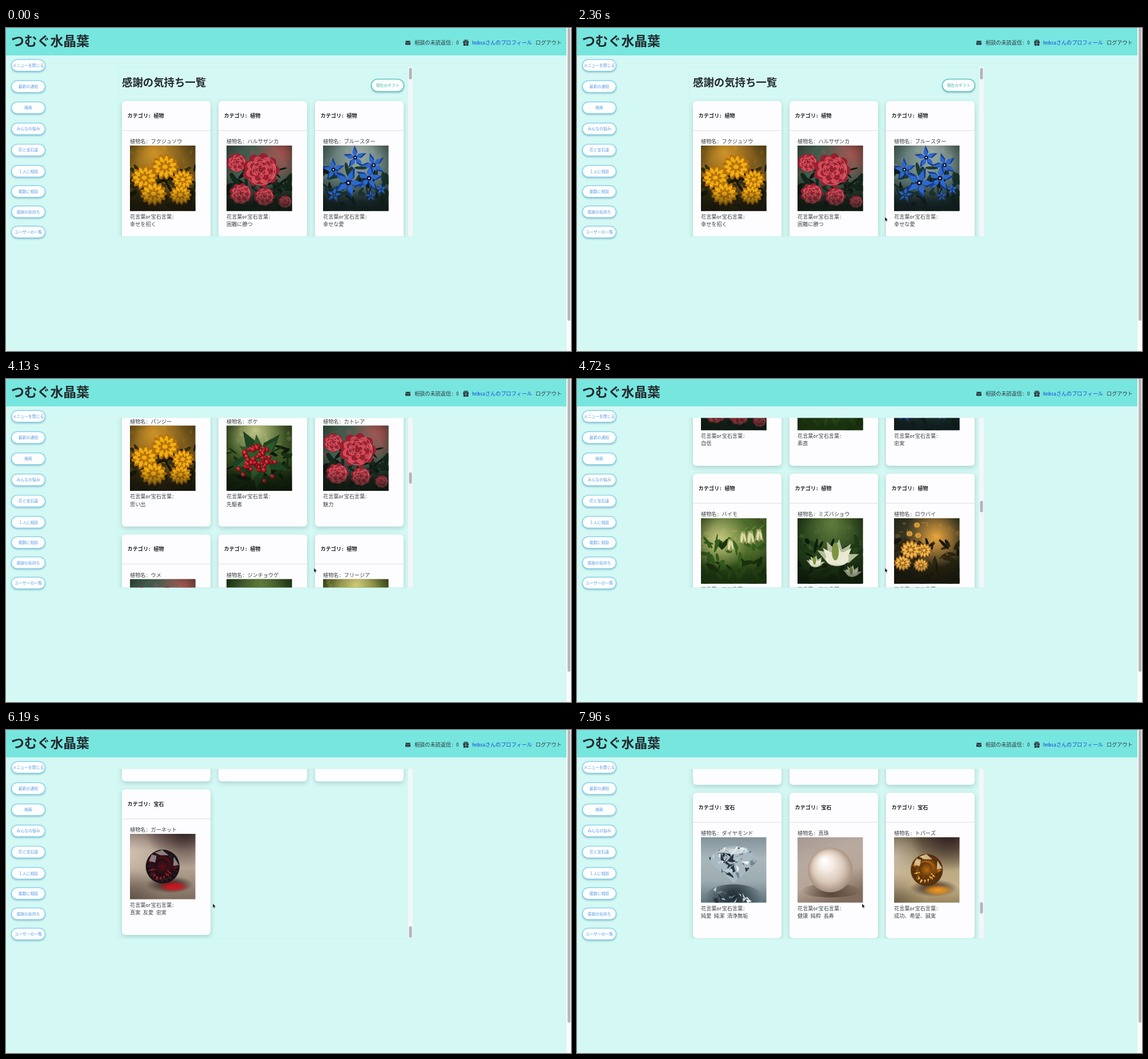
Recreate the animation shown at these times as an HTML page with a canvas. Size 989 by 566 pixels, loop 8000 ms.

```html
<!DOCTYPE html>
<html lang="ja">
<head>
<meta charset="utf-8">
<title>感謝の気持ち一覧</title>
<style>
html, body { margin: 0; width: 100%; height: 100%; overflow: hidden; background: #d4f8f4; }
canvas { display: block; }
</style>
</head>
<body>
<canvas id="stage" width="989" height="566"></canvas>
<script>
const ctx = document.getElementById('stage').getContext('2d');
const LOOP = 8000, STEP = 294.8, TAU = Math.PI * 2;
const FONT = '"Noto Sans Mono CJK JP", "Noto Sans CJK JP", "Noto Sans CJK", sans-serif';
const MAX_SCROLL = 3521, ROW = 269, PHOTO = 114.5;

// Key poses: [step, value...]
const scrollKeys = [[9, 0], [10, 60], [11, 234], [16, 1845], [20, MAX_SCROLL], [25, MAX_SCROLL], [26, 3290], [27, 2977]];
const cursorKeys = [[4, 690, 543], [5, 639, 487], [7, 539, 331], [20, 539, 331], [21, 362, 304],
  [22, 285, 250], [23, 400, 285], [24, 500, 306], [25, 499, 304]];

const rows = [
  'フクジュソウ:幸せを招く:gold|ハルサザンカ:困難に勝つ:rose|ブルースター:幸せな愛:star',
  'ラッパスイセン:尊敬:daffodil|マンリョウ:寿ぎ:berry|ナワシロイチゴ:恩恵:straw',
  'スノードロップ:希望:bell|スイートピー:門出:rose|アネモネ:期待:star',
  'ヒヤシンス:遊び心:star|クロッカス:青春:cup|シクラメン:内気:rose',
  'パンジー:思い出:gold|ボケ:先駆者:berry|カトレア:魅力:rose',
  'ウメ:高潔:rose|ジンチョウゲ:栄光:cup|フリージア:純潔:daffodil',
  'プリムラ:自信:rose|ネコヤナギ:素直:bell|スミレ:忠実:star',
  'バイモ:威厳:bell|ミズバショウ:美しい思い出:cup|ロウバイ:慈愛:amber',
  'ツバキ:誇り:rose|サンシュユ:持続:amber|モクレン:崇高:cup',
  'タンポポ:誠実:gold|アヤメ:吉報:star|スズラン:再来:bell',
  'エメラルド:幸運:emerald|ルビー:情熱:garnet|サファイア:誠実:sapphire',
  'ダイヤモンド:純愛 純潔 清浄無垢:diamond|真珠:健康 純粋 長寿:pearl|トパーズ:成功、希望、誠実:topaz',
  'アメジスト:心の平和:amethyst|オパール:希望:pearl|ターコイズ:成功:sapphire',
  'ガーネット:真実 友愛 忠実:garnet'
].map(r => r.split('|').map(s => s.split(':')));

const menu = ['メニューを閉じる', '最新の通知', '検索', 'みんなの悩み', '花と宝石達', '１人に相談', '複数に相談', '感謝の気持ち', 'ユーザーの一覧'];

function random(seed) {
  return () => {
    seed = (seed * 16807) % 2147483647;
    return seed / 2147483647;
  };
}

function sample(keys, k) {
  if (k <= keys[0][0]) return keys[0].slice(1);
  for (let i = 1; i < keys.length; i++) {
    const a = keys[i - 1], b = keys[i];
    if (k <= b[0]) {
      const u = (k - a[0]) / (b[0] - a[0]);
      return a.slice(1).map((v, j) => v + (b[j + 1] - v) * u);
    }
  }
  return keys[keys.length - 1].slice(1);
}

// Shape helpers
function rect(x, y, w, h, c) { ctx.fillStyle = c; ctx.fillRect(x, y, w, h); }

function round(x, y, w, h, r, c) {
  ctx.beginPath();
  ctx.roundRect(x, y, w, h, r);
  ctx.fillStyle = c;
  ctx.fill();
}

function oval(x, y, rx, ry, c, turn = 0) {
  ctx.beginPath();
  ctx.ellipse(x, y, rx, ry, turn, 0, TAU);
  ctx.fillStyle = c;
  ctx.fill();
}

function poly(points, c) {
  ctx.beginPath();
  points.forEach(p => ctx.lineTo(p[0], p[1]));
  ctx.closePath();
  ctx.fillStyle = c;
  ctx.fill();
}

function line(x1, y1, x2, y2, w, c) {
  ctx.beginPath();
  ctx.moveTo(x1, y1);
  ctx.lineTo(x2, y2);
  ctx.lineWidth = w;
  ctx.strokeStyle = c;
  ctx.stroke();
}

function text(s, x, y, size, c, weight = 400, align = 'left') {
  ctx.font = `${weight} ${size}px ${FONT}`;
  ctx.textAlign = align;
  ctx.fillStyle = c;
  ctx.fillText(s, x, y + size * 0.37);
}

function shadow(c, blur, dy) {
  ctx.shadowColor = c;
  ctx.shadowBlur = blur;
  ctx.shadowOffsetY = dy;
}
const noShadow = () => shadow('transparent', 0, 0);

function stops(g, colors) {
  colors.forEach((c, i) => g.addColorStop(i / (colors.length - 1), c));
  return g;
}
const blend = (x0, y0, x1, y1, ...colors) => stops(ctx.createLinearGradient(x0, y0, x1, y1), colors);
const halo = (x, y, r, ...colors) => stops(ctx.createRadialGradient(x, y, 0, x, y, r), colors);
const wash = c => rect(0, 0, 115, 115, c);
const light = (x, y, r, c, alpha = 'ff') => wash(halo(x, y, r, c + alpha, c + '00'));

// Flowers
function petals(x, y, n, r, w, c, phase = 0) {
  for (let i = 0; i < n; i++) {
    const a = phase + i / n * TAU;
    oval(x + Math.cos(a) * r * 0.58, y + Math.sin(a) * r * 0.5, r * 0.44, r * w, c, a);
  }
}

function spikes(x, y, n, r, c, from, to) {
  for (let i = 0; i < n; i++) {
    const a = from + (to - from) * i / n;
    const at = (d, s) => [x + Math.cos(a + d) * r * s, y + Math.sin(a + d) * r * s];
    poly([[x, y], at(-0.42, 0.5), at(0, 1), at(0.42, 0.5)], c);
  }
}

const blooms = {
  daisy(x, y, r, a, b) {
    oval(x, y + r * 0.3, r * 0.8, r * 0.6, '#00000055');
    petals(x, y, 13, r, 0.19, b);
    petals(x, y, 11, r * 0.85, 0.17, a, 0.3);
    petals(x, y, 8, r * 0.5, 0.2, b, 0.1);
    oval(x, y, r * 0.2, r * 0.16, a);
  },
  rose(x, y, r, a, b) {
    for (let i = 0; i < 5; i++) petals(x, y, 9 - i, r * (1 - i * 0.18), 0.32, i % 2 ? a : b, i * 0.5);
    for (let i = 0; i < 5; i++) {
      ctx.beginPath();
      ctx.arc(x, y, r * (0.16 + i * 0.16), i * 1.3, i * 1.3 + 3.6);
      ctx.lineWidth = 0.9;
      ctx.strokeStyle = i % 2 ? b : '#e88a8a';
      ctx.stroke();
    }
  },
  star(x, y, r, a, b) {
    spikes(x, y, 5, r, b, r, r + TAU);
    spikes(x, y, 5, r * 0.85, a, r - 0.1, r - 0.1 + TAU);
    oval(x, y, r * 0.16, r * 0.16, '#0b1238');
    oval(x, y, r * 0.06, r * 0.06, '#dfe8ff');
  },
  berry(x, y, r, a, b) {
    oval(x, y, r, r, b);
    oval(x - r * 0.15, y - r * 0.15, r * 0.75, r * 0.75, a);
    oval(x - r * 0.3, y - r * 0.4, r * 0.2, r * 0.2, '#f0948c');
  },
  straw(x, y, r, a, b) {
    line(x, y - r, x + 3, y - r * 2.4, 0.9, '#6f8c2c');
    oval(x, y, r * 0.85, r, b);
    oval(x - 1, y - 1, r * 0.65, r * 0.75, a);
    spikes(x, y - r * 0.8, 5, r * 0.7, '#6d8c2d', -0.4, 4);
  },
  bell(x, y, r, a, b) {
    line(x, y - r, x + r * 0.8, y - r * 1.7, 1.2, '#6f9a3a');
    poly([[x - r * 0.35, y - r], [x + r * 0.35, y - r], [x + r * 0.75, y + r], [x + r * 0.35, y + r * 0.7],
      [x, y + r], [x - r * 0.35, y + r * 0.7], [x - r * 0.75, y + r]], b);
    oval(x - r * 0.15, y, r * 0.22, r * 0.8, a, 0.12);
    oval(x + r * 0.3, y, r * 0.15, r * 0.7, a, -0.2);
  },
  cup(x, y, r, a, b) {
    spikes(x, y + r * 0.6, 5, r * 1.3, b, -2.6, 0.2);
    spikes(x, y + r * 0.7, 3, r * 1.2, a, -2.3, -0.1);
    oval(x, y + r * 0.4, r * 0.65, r * 0.42, a);
    oval(x - r * 0.1, y, r * 0.2, r * 0.5, '#7d9440');
  }
};

const scenes = {
  gold: { sky: '#8a6420', ground: '#1b170c', glow: ['#e3a12b', 40, 12], leaf: '#38330f', kind: 'daisy', tint: ['#eeb014', '#b87008'],
    at: [[61, 37, 24], [92, 59, 19], [25, 56, 23], [88, 86, 19], [41, 84, 23]] },
  rose: { sky: '#4a6455', ground: '#101a14', glow: ['#c9605f', 100, 10], leaf: '#162c20', kind: 'rose', tint: ['#d34c58', '#972031'],
    at: [[18, 30, 18], [102, 98, 12], [60, 43, 32], [66, 89, 18], [25, 84, 20]] },
  star: { sky: '#6a8684', ground: '#101d20', glow: ['#a9bab4', 65, 10], leaf: '#1d3a34', kind: 'star', tint: ['#2b69cf', '#173a90'],
    at: [[56, 21, 21], [88, 34, 22], [18, 42, 21], [80, 57, 25], [44, 65, 29], [19, 86, 15], [83, 88, 11], [101, 76, 11]] },
  daffodil: { sky: '#68762a', ground: '#18290c', glow: ['#e6dc83', 58, 10], leaf: '#2b4714', kind: 'daisy', tint: ['#f0bd2b', '#c98711'],
    stems: true, at: [[15, 38, 10], [32, 34, 9], [52, 27, 9], [70, 31, 10], [89, 39, 12], [24, 55, 8], [43, 48, 11], [67, 49, 11], [84, 57, 9], [99, 55, 8]] },
  berry: { sky: '#47612a', ground: '#0e190b', glow: ['#d5da94', 50, 8], leaf: '#1c3717', kind: 'berry', tint: ['#c31f2b', '#690a15'],
    cluster: [57, 57, 27], at: [[21, 76, 4], [29, 86, 4], [80, 89, 4], [66, 97, 4]] },
  straw: { sky: '#66792f', ground: '#152610', glow: ['#dcda92', 56, 14], leaf: '#2f4e19', kind: 'straw', tint: ['#cf292f', '#8d1219'],
    white: true, at: [[41, 36, 8], [70, 39, 8], [29, 65, 7], [93, 68, 7], [76, 88, 8], [25, 84, 6], [73, 54, 6], [106, 60, 5]] },
  bell: { sky: '#55762f', ground: '#1b360f', glow: ['#d8d889', 30, 36], leaf: '#3a651e', kind: 'bell', tint: ['#dddca6', '#929d58'],
    at: [[51, 47, 11], [73, 34, 11], [86, 34, 12], [101, 30, 11]] },
  cup: { sky: '#2f4d21', ground: '#0f1d0b', glow: ['#6b8742', 60, 8], leaf: '#214118', kind: 'cup', tint: ['#eae9d4', '#b5bd9a'],
    at: [[31, 74, 14], [95, 91, 14], [69, 58, 31]] },
  amber: { sky: '#3d3a28', ground: '#1a170f', glow: ['#f5ad42', 75, 32], leaf: '#33290f', kind: 'daisy', tint: ['#eeb850', '#a76c1d'],
    at: [[15, 78, 15], [52, 56, 14], [29, 55, 18], [47, 82, 13], [27, 27, 6], [40, 12, 6], [42, 30, 6]] }
};

function drawScene(s) {
  const rnd = random(s.at.length * 977 + s.at[0][0]);
  wash(blend(0, 0, 0, 114, s.sky, s.sky, s.ground));
  const [glow, gx, gy] = s.glow;
  light(gx, gy, 55, glow);
  for (let i = 0; i < 18; i++) oval(rnd() * 114, rnd() * 55, 1 + rnd() * 4, 1 + rnd() * 4, glow + '44');
  for (let i = 0; i < 60; i++) {
    oval(rnd() * 114, 38 + rnd() * 76, 5 + rnd() * 9, 1.5 + rnd() * 3, i % 3 ? s.leaf : s.ground, rnd() * 3);
  }
  wash(halo(57, 42, 88, '#08100600', '#08100622', '#081006bb'));
  if (s.stems) {
    for (let i = 0; i < 16; i++) line(51 + i * 3, 50 + i % 3 * 4, 55 + i * 2.6, 105, 2.6, i % 2 ? '#3b6618' : '#1c380c');
  }
  const draw = (x, y, r) => blooms[s.kind](x, y, r, ...s.tint);
  if (s.cluster) {
    const [cx, cy, cr] = s.cluster;
    spikes(cx, cy, 5, 55, '#1f4320', 0.4, 0.4 + TAU);
    spikes(cx, cy, 7, 42, '#30582a', 0.1, 0.1 + TAU);
    for (let i = 0; i < 50; i++) {
      const a = rnd() * TAU, d = cr * Math.sqrt(1 - i / 50);
      draw(cx + Math.cos(a) * d * 1.1, cy + Math.sin(a) * d * 0.85, 3 + rnd() * 1.6);
    }
  }
  if (s.white) for (const [x, y] of [[53, 58], [60, 72], [17, 53], [94, 35], [35, 92]]) {
    petals(x, y, 5, 8, 0.32, '#e6e4d4');
    oval(x, y, 2, 2, '#c9a932');
  }
  s.at.forEach(b => draw(...b));
  wash(blend(0, 78, 0, 114, s.ground + '00', s.ground + 'cc'));
}

// Gems
function roundGem(cx, cy, r, [dark, mid, bright, shine]) {
  const rnd = random(41);
  const at = (a, s) => [cx + Math.cos(a) * r * s, cy + Math.sin(a) * r * s];
  oval(cx, cy, r, r, dark);
  for (let i = 0; i < 20; i++) {
    const a = i / 20 * TAU;
    poly([at(a, 0.97), at(a + 0.25, 0.7), at(a - 0.1, 0.66)], rnd() < 0.3 ? mid : '#4b414455');
  }
  oval(cx, cy, r * 0.7, r * 0.7, blend(0, cy - r * 0.7, 0, cy + r * 0.7, mid, dark));
  for (let i = 0; i < 26; i++) {
    const a = 0.1 + rnd() * 2.9, s = 0.35 + rnd() * 0.4;
    poly([at(a, s), at(a + 0.12, s + 0.2), at(a + 0.2, s - 0.05)], i % 2 ? bright : dark);
  }
  for (let i = 0; i < 16; i++) {
    const a = Math.PI + i / 16 * Math.PI;
    poly([at(a, 0.7), at(a + 0.1, 0.52), at(a + 0.2, 0.7)], dark);
  }
  oval(cx - r * 0.08, cy - r * 0.08, r * 0.42, r * 0.4, halo(cx, cy, r * 0.5, mid, dark));
  poly([at(-2.75, 0.88), at(-2.3, 0.96), at(-2.1, 0.72), at(-2.65, 0.5)], shine);
  poly([at(-2.1, 0.95), at(-1.6, 0.99), at(-1.1, 0.75), at(-1.75, 0.68)], shine);
  poly([at(-0.72, 0.88), at(-0.1, 0.97), at(-0.05, 0.62)], shine);
}

function stone(back, glow, colors, r = 29.5) {
  return () => {
    wash(blend(0, 0, 0, 114, ...back));
    light(0, 34, 55, '#dccdbd', 'aa');
    light(95, -8, 68, '#2a191c', 'f0');
    light(0, 118, 55, '#4a3d34', '99');
    ctx.save();
    ctx.translate(77, 92);
    ctx.scale(1, 0.36);
    oval(-8, -10, 42, 42, halo(-8, -10, 42, '#1a0e0eee', '#1a0e0e88', '#1a0e0e00'));
    oval(-1, 0, 27, 27, halo(-1, 0, 27, glow, glow + 'bb', glow + '00'));
    ctx.restore();
    roundGem(57, 57, r, colors);
  };
}

const beige = ['#7a6860', '#b7a595', '#b5a493', '#9c8b7b', '#7c6c5f'];
const gems = {
  garnet: stone(beige, '#d3161f', ['#180f14', '#5a0f18', '#ad1b26', '#aaa3a2c0']),
  emerald: stone(beige, '#1fae68', ['#0b2418', '#126640', '#38bd79', '#cfe0d6c0']),
  sapphire: stone(beige, '#2b5fd8', ['#0c1534', '#193d94', '#4a82e2', '#cdd6e6c0']),
  amethyst: stone(beige, '#9148cc', ['#22102f', '#5d2c88', '#a868db', '#dbcfe2c0']),
  topaz: stone(['#62563f', '#8d7d5e', '#bba981', '#c4b088', '#9a865f'], '#f59a1c', ['#5a300a', '#b76b10', '#f4b63c', '#f3dfb4c0'], 28),
  pearl() {
    wash(blend(15, 0, 60, 114, '#a79b93', '#b9aaa0', '#b7a598', '#806c5d'));
    oval(58, 93, 52, 12, halo(58, 93, 52, '#4b382cdd', '#4b382c00'));
    const g = ctx.createRadialGradient(46, 40, 2, 57, 57, 40);
    oval(57, 57, 39, 39, stops(g, ['#ffffff', '#f2e8df', '#dac8b9', '#a28b7b']));
  },
  diamond() {
    const rnd = random(73), shades = ['#26343e', '#eef5f8', '#71858f', '#bccdd5', '#17222a'];
    const shards = (n, x, y, w, h, size) => {
      for (let i = 0; i < n; i++) {
        const px = x + rnd() * w, py = y + rnd() * h;
        const p = () => [px + (rnd() - 0.5) * size, py + (rnd() - 0.5) * size];
        poly([p(), p(), p()], shades[i % 5]);
      }
    };
    wash(blend(0, 0, 0, 114, '#82939a', '#a9b7bb', '#9dacb1', '#5f727b'));
    oval(57, 104, 50, 22, halo(57, 104, 50, '#1c2a32', '#1c2a3288', '#1c2a3200'));
    shards(24, 25, 92, 64, 22, 16);
    ctx.save();
    poly([[34, 19], [57, 15], [80, 19], [100, 36], [97, 43], [57, 80], [17, 43], [14, 36]], '#a9b9c1');
    ctx.clip();
    shards(110, 14, 15, 86, 65, 20);
    poly([[36, 20], [78, 20], [84, 26], [57, 30], [30, 26]], '#d5e0e4cc');
    ctx.restore();
  }
};

function photo(key, x, y, size) {
  ctx.save();
  ctx.translate(x, y);
  ctx.scale(size / 114, size / 114);
  ctx.beginPath();
  ctx.rect(0, 0, 114, 114);
  ctx.clip();
  if (gems[key]) gems[key]();
  else drawScene(scenes[key]);
  ctx.restore();
}

// Page parts
function pill(label, cx, cy, w, h, edge, ink) {
  shadow('rgba(40,110,150,.4)', 3, 1.5);
  round(cx - w / 2, cy - h / 2, w, h, h / 2, edge);
  noShadow();
  round(cx - w / 2 + 1.2, cy - h / 2 + 1.2, w - 2.4, h - 2.4, h / 2, '#fdfeff');
  text(label, cx, cy, 6.86, ink, 400, 'center');
}

function header() {
  rect(0, 0, 981, 48, '#76e6de');
  text('つむぐ水晶葉', 9, 23, 22.8, '#24292e', 700);
  round(699, 22.5, 9, 7, 1, '#2a3038');
  ctx.beginPath();
  [[699, 24], [703.5, 27], [708, 24]].forEach(p => ctx.lineTo(...p));
  ctx.lineWidth = 0.8;
  ctx.strokeStyle = '#76e6de';
  ctx.stroke();
  text('相談の未読返信: 0', 715, 26, 9.14, '#30383e');
  round(800, 23.5, 10, 3, 0.6, '#2a3038');
  round(800.7, 27, 8.6, 4, 0.6, '#2a3038');
  line(805, 23.5, 805, 31, 0.9, '#76e6de');
  ctx.lineWidth = 1.1;
  ctx.strokeStyle = '#2a3038';
  for (const x of [803.2, 806.8]) {
    ctx.beginPath();
    ctx.ellipse(x, 22.3, 1.6, 1.2, 0, 0, TAU);
    ctx.stroke();
  }
  text('hnbsaさんのプロフィール', 816, 26, 9.14, '#1647dc');
  text('ログアウト', 927, 26, 9.14, '#30383e');
}

function card([name, word, key], x, y, kind) {
  shadow('rgba(0,60,60,.2)', 8, 3);
  round(x, y, 155, 255, 6, '#fdfdff');
  noShadow();
  rect(x, y + 51, 155, 1.3, '#e3e4e9');
  text('カテゴリ: ' + kind, x + 9.5, y + 25.5, 9.14, '#222529', 700);
  text('植物名: ' + name, x + 14, y + 71, 9.14, '#3c4044');
  photo(key, x + 14, y + 78, PHOTO);
  text('花言葉or宝石言葉:', x + 14, y + 202.5, 9.14, '#3c4044');
  text(word, x + 14, y + 216, 9.14, '#3c4044');
}

function list(scroll) {
  ctx.save();
  ctx.beginPath();
  ctx.rect(196, 68, 508, 297.5);
  ctx.clip();
  if (scroll < 80) {
    text('感謝の気持ち一覧', 203, 95 - scroll, 18.4, '#24292e', 700);
    pill('現在のギフト', 668, 100.5 - scroll, 58, 23, '#48c3b6', '#45b9a6');
  }
  rows.forEach((row, i) => {
    const y = 128 + i * ROW - scroll;
    if (y > 375 || y < -200) return;
    row.forEach((item, j) => card(item, 203 + j * 169, y, i < 10 ? '植物' : '宝石'));
  });
  ctx.restore();
  ctx.lineWidth = 1;
  ctx.strokeStyle = 'rgba(170,232,224,.25)';
  ctx.strokeRect(196.5, 68.5, 515, 297);
  rect(704, 68, 8, 297.5, '#f4f6f7');
  round(705.5, 70 + scroll / MAX_SCROLL * 274, 5, 20, 2.5, '#b3b5b6');
}

function arrow(x, y) {
  const p = [[0, 0], [0, 7.6], [1.7, 6.2], [2.9, 8.8], [4.1, 8.2], [3, 5.7], [5.2, 5.5]].map(([a, b]) => [x + a, y + b]);
  poly(p, '#111');
  ctx.lineWidth = 0.5;
  ctx.strokeStyle = '#fff';
  ctx.stroke();
}

function hand(x, y) {
  shadow('#000', 2, 0);
  round(x - 1.8, y - 1, 2, 7, 1, '#fff');
  round(x - 1.8, y + 2.5, 6.4, 6, 2, '#fff');
  oval(x - 2.6, y + 4.8, 1, 2, '#fff', -0.5);
  noShadow();
}

function modal(closing) {
  rect(0, 0, 981, 566, 'rgba(14,14,18,.9)');
  rect(0, 0, 981, 48, 'rgba(35,105,105,.1)');
  photo('garnet', 307, 99.5, 366.5);
  if (!closing) return;
  // The shrinking copy darkens what lies under it
  ctx.globalCompositeOperation = 'multiply';
  ctx.globalAlpha = 0.6;
  photo('garnet', 350.5, 170, 229);
  ctx.globalAlpha = 1;
  ctx.globalCompositeOperation = 'source-over';
}

function draw(k) {
  rect(0, 0, 989, 566, '#d4f8f4');
  header();
  menu.forEach((label, i) => pill(label, 39, 65.5 + i * 37.1 - Math.max(0, i - 5) * 1.6, 60, 21.5, '#7fd0ea', '#579be6'));
  list(sample(scrollKeys, k)[0]);
  if (k === 23 || k === 24) modal(k === 24);
  rect(981, 0, 8, 566, '#fafafa');
  round(983, 0, 5, 513, 2.5, '#b8b8b8');
  if (k >= 4) (k >= 22 && k <= 24 ? hand : arrow)(...sample(cursorKeys, k));
}

let shown = -1;
function tick(now) {
  const k = Math.floor((now % LOOP + 5) / STEP);
  if (k !== shown) draw(shown = k);
  requestAnimationFrame(tick);
}
draw(0);
requestAnimationFrame(tick);
</script>
</body>
</html>
```
